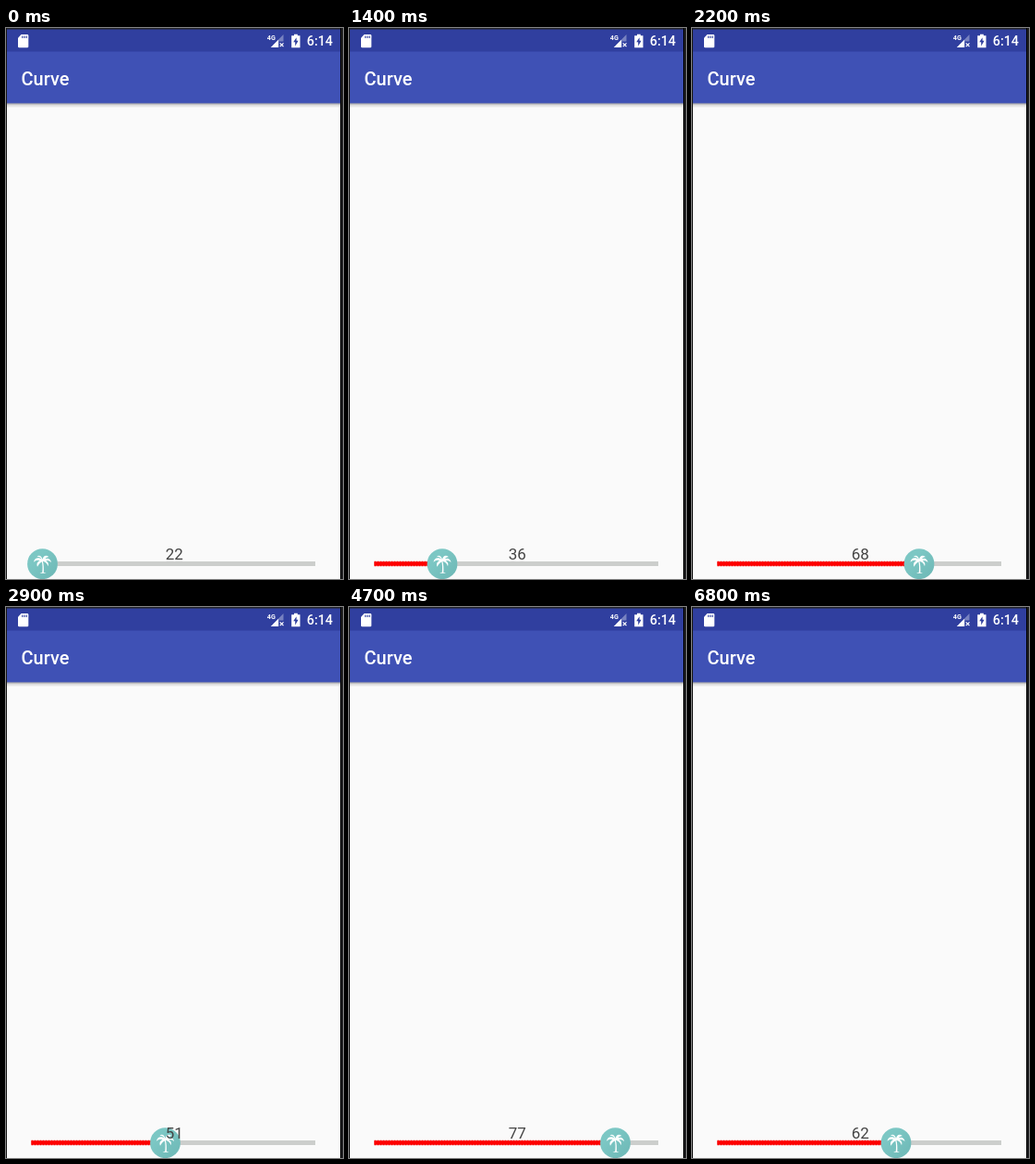
An HTML page that plays this animation: 365x596 px, repeating every 8500 ms.

```html
<!DOCTYPE html>
<html lang="en">
<head>
<meta charset="utf-8">
<title>Curve</title>
<style>
  html, body { margin: 0; width: 100%; height: 100%; overflow: hidden; background: #fafafa; }
  svg { display: block; width: 365px; height: 596px; }
  text { font-family: Roboto, sans-serif; }
  .bar { fill: #fff; font-weight: 500; }
</style>
</head>
<body>
<svg viewBox="0 0 365 596">
  <defs>
    <linearGradient id="shadow" x1="0" y1="0" x2="0" y2="1">
      <stop offset="0" stop-opacity=".36"/>
      <stop offset=".4" stop-opacity=".12"/>
      <stop offset="1" stop-opacity="0"/>
    </linearGradient>
    <linearGradient id="teal" x1="0" y1="0" x2="1" y2="1">
      <stop offset=".3" stop-color="#7cc7c4"/>
      <stop offset="1" stop-color="#6db7b5"/>
    </linearGradient>
  </defs>

  <rect width="365" height="596" fill="#fafafa"/>
  <rect width="365" height="26" fill="#303f9f"/>
  <rect y="25.5" width="365" height="56" fill="#3f51b5"/>
  <rect y="81.5" width="365" height="5" fill="url(#shadow)"/>
  <text class="bar" x="16.5" y="62" font-size="20">Curve</text>

  <!-- status icons -->
  <path d="M16.5 7H23q1.3 0 1.3 1.3V20q0 1.3-1.3 1.3h-8.700q-1.300 0-1.300-1.300v-9.300z" fill="#fff"/>
  <path d="M17.800 8.500v2.500M20 8.500v2.500M22.200 8.500v2.500" stroke="#303f9f" stroke-width="1.100"/>
  <text class="bar" x="282.800" y="13.200" font-size="7.200" style="font-weight:700">4G</text>
  <path d="M300.500 7v7.500h-5v6.500h-8.700z" fill="#fff" opacity=".35"/>
  <path d="M295 12.700V21h-8.200z" fill="#fff"/>
  <path d="M296.700 16.300l3.800 3.800m0-3.800l-3.800 3.800" stroke="#fff" stroke-width="1.200"/>
  <path d="M312 6.700h3.800v1.500h2.700V21.200h-9.300V8.200H312z" fill="#fff"/>
  <path d="M314.600 10.300v3.500h2l-3.400 5.600v-4.200h-2z" fill="#303f9f"/>
  <text class="bar" x="325.800" y="19.300" font-size="14.300">6:14</text>

  <!-- slider -->
  <rect x="27.500" y="577" width="307.500" height="5" fill="#cccecc"/>
  <g stroke="#f00">
    <path id="fill" stroke-width="4.200"/>
    <path id="ticks" stroke-width="5.400" stroke-dasharray="2 1"/>
  </g>
  <g id="thumb">
    <circle r="16.400" fill="url(#teal)"/>
    <g fill="#fff">
      <path d="M0-5C-1-9-4-10-6-8-3-8-2-7-1-5-5-8-9-6-9.500-2-7-4-5-4-3-3.800-6-2-6.500 0-5.500 3-4 0-2-2 .5-3 3-2 5-1 6 2.500 7-.5 6-2 4-3.500 6-4 8-3 9.500-1.500 9-5.500 6-7 3-5.500 4-7 5-7.500 7-7.500 4-10 1-9 0-5z"/>
      <path d="M.2-4C1.500 1 1.600 5 1.300 9.500H-.3C.3 5 .2 1-.8-3z"/>
      <path d="M-3 10Q.5 8 4 10z"/>
    </g>
  </g>
  <text id="value" x="182.200" y="574.800" font-size="17" text-anchor="middle" fill="#444"></text>

  <!-- window edges -->
  <rect width="365" height="1.500" fill="#22242c"/>
  <rect width="1" height="596" fill="#161616"/>
  <rect x="362" width="3" height="596" fill="#1d1d1f"/>
  <rect x="362" width="1" height="596" fill="#000"/>
</svg>
<script>
  const LOOP = 8500, STEP = 100, START = 27.5, Y = 579.5;
  // [time in ms, thumb centre x]
  const path = [
    [0, 39.5], [900, 39.5], [1000, 44], [1200, 67], [1400, 101], [1800, 181.5],
    [2000, 222], [2200, 246], [2300, 248.5], [2400, 245], [2700, 203],
    [3100, 142], [3200, 140.5], [3300, 150], [3600, 230.5], [3900, 276.5],
    [4600, 276.5], [4700, 288.5], [5000, 335.5], [6100, 335.5],
    [6200, 325.5], [6800, 221], [LOOP, 221]
  ];
  const [fill, ticks, thumb, value] =
    ['fill', 'ticks', 'thumb', 'value'].map(id => document.getElementById(id));

  function thumbAt(time) {
    const i = path.findIndex(([t]) => t > time);
    const [t0, x0] = path[i - 1], [t1, x1] = path[i];
    return x0 + (x1 - x0) * (time - t0) / (t1 - t0);
  }

  function draw(now) {
    const x = thumbAt(Math.floor((now % LOOP) / STEP) * STEP);
    const line = `M${START} ${Y}H${x}`;
    fill.setAttribute('d', line);
    ticks.setAttribute('d', line);
    thumb.setAttribute('transform', `translate(${x} ${Y + 0.2})`);
    value.textContent = Math.round(22.1 + (x - 39.5) * 0.2203);
  }

  const origin = performance.now();
  function tick() {
    draw(performance.now() - origin);
    requestAnimationFrame(tick);
  }
  tick();
</script>
</body>
</html>
```
